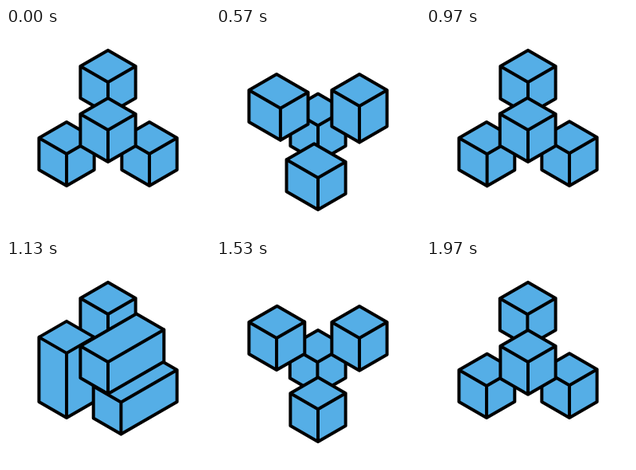
Animation of 256 by 256 pixels, one loop 2010 ms. Source, as an HTML page:

```html
<!DOCTYPE html>
<html lang="en">
<head>
<meta charset="utf-8">
<title>Sliding blocks</title>
<style>
  html, body { margin: 0; width: 100%; height: 100%; overflow: hidden; background: #fff; }
  svg { display: block; width: 100%; height: 100%; }
  path { fill: #55aee6; stroke: #000; stroke-width: 4; stroke-linejoin: round; }
</style>
</head>
<body>
<svg viewBox="0 0 256 256"><path/><path/><path/><path/></svg>
<script>
const LOOP = 2010, FRAMES = 60, PHASE = 15;  // PHASE and SLIDE in frames
const SLIDE = 7, TAIL_START = 8;
const SIDE = 40, STEP = 60;
const COS30 = Math.sqrt(3) / 2;
const paths = document.querySelectorAll('path');

// Per phase, back to front: start cell on the 2x2x2 grid and the axis to cross.
const phases = [
  [[1, 0, 0, 'x'], [0, 0, 1, 'x'], [0, 1, 0, 'z'], [1, 1, 1, 'z']],
  [[0, 0, 0, 'z'], [1, 0, 1, 'z'], [1, 1, 0, 'x'], [0, 1, 1, 'x']],
  [[0, 0, 1, 'z'], [0, 1, 0, 'z'], [1, 0, 0, 'y'], [1, 1, 1, 'y']],
  [[0, 0, 0, 'y'], [0, 1, 1, 'y'], [1, 0, 1, 'z'], [1, 1, 0, 'z']]
];

function ease(t) {
  t = Math.min(1, Math.max(0, t));
  return t < 0.5 ? 4 * t ** 3 : 1 - 4 * (1 - t) ** 3;
}

function project([x, y, z]) {
  const sx = 128 + (x - y) * COS30;
  const sy = 128 + (x + y) / 2 - z;
  return sx.toFixed(2) + ' ' + sy.toFixed(2);
}

const face = corners => 'M' + corners.map(project).join('L') + 'Z';

function boxPath([x, y, z], [X, Y, Z]) {
  return face([[x, y, Z], [X, y, Z], [X, Y, Z], [x, Y, Z]]) +
         face([[X, y, z], [X, Y, z], [X, Y, Z], [X, y, Z]]) +
         face([[x, Y, z], [X, Y, z], [X, Y, Z], [x, Y, Z]]);
}

function draw(frame) {
  const local = frame % PHASE;
  const head = ease(local / SLIDE);
  const tail = ease((local - TAIL_START) / SLIDE);

  phases[Math.floor(frame / PHASE)].forEach((move, i) => {
    const low = move.slice(0, 3), high = low.slice();
    const axis = 'xyz'.indexOf(move[3]);
    const forward = low[axis] === 0;
    low[axis] = forward ? tail : 1 - head;
    high[axis] = forward ? head : 1 - tail;
    paths[i].setAttribute('d', boxPath(
      low.map(v => v * STEP),
      high.map(v => v * STEP + SIDE)
    ));
  });
}

// 30 steps a second, each starting on a multiple of 10 ms.
function frameAt(ms) {
  const tick = Math.floor((ms % LOOP) / 10) * 10;
  return Math.min(FRAMES - 1, Math.floor((tick + 5) * 0.03));
}

const start = performance.now();
function run() {
  draw(frameAt(performance.now() - start));
  requestAnimationFrame(run);
}
run();
</script>
</body>
</html>
```
